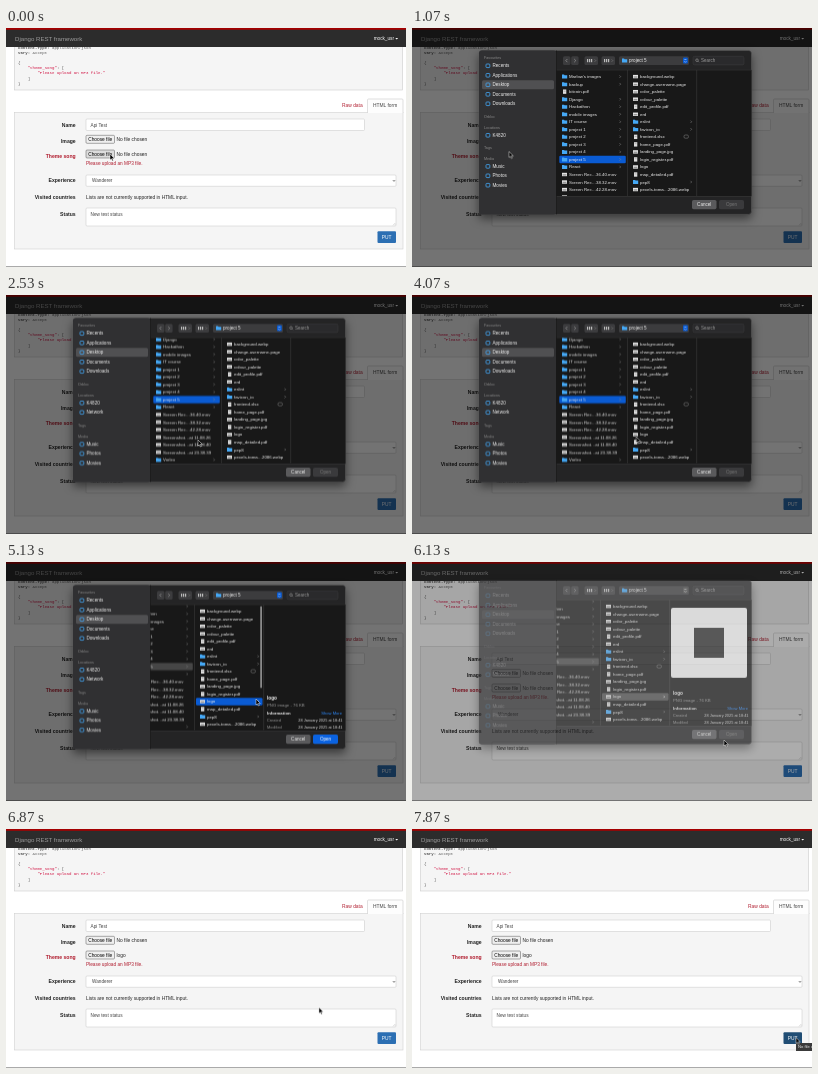
An HTML page for the animation above (8000 ms loop, 400 px wide and 239 px high).

```html
<!DOCTYPE html>
<html lang="en">
<head>
<meta charset="utf-8">
<title>Uploading a file through an API form</title>
<style>
html, body { margin: 0; width: 100%; height: 100%; overflow: hidden; background: #fff; }
svg { display: block; width: 100vw; height: 100vh; font-family: "Liberation Sans", Arial, sans-serif; }
.mono { font-family: "Liberation Mono", monospace; white-space: pre; }
.b { font-weight: bold; }
.a { animation: 8s linear infinite; }
.s { animation: 8s step-end infinite; }
.shadow { filter: drop-shadow(0 4px 5px rgba(0, 0, 0, .5)); }

.pointer { animation-name: pointer; animation-timing-function: ease-in-out; }
@keyframes pointer {
  0%, .6% { transform: translate(104px, 126px); }
  6.6%, 13.4% { transform: translate(97px, 123.5px); }
  23.4% { transform: translate(190px, 142px); }
  31.5%, 37.8% { transform: translate(192px, 145px); }
  48.4%, 50% { transform: translate(224px, 142px); }
  60.9%, 65% { transform: translate(250px, 137px); }
  74.4%, 85% { transform: translate(312px, 178px); }
  95.9%, 100% { transform: translate(384px, 208.5px); }
}
.dim { animation-name: dim; }
@keyframes dim {
  0%, 13.37% { opacity: 0; }
  13.375%, 75% { opacity: .55; }
  79%, 100% { opacity: 0; }
}
.sheet { animation-name: sheet; }
@keyframes sheet {
  0%, 13.37% { opacity: 0; }
  13.375%, 75% { opacity: 1; }
  76.6% { opacity: .66; }
  78.4% { opacity: .25; }
  80%, 100% { opacity: 0; }
}
.drift { animation-name: drift; }
@keyframes drift {
  0%, 13.4% { transform: none; }
  15%, 75.2% { transform: translateY(.6px); }
  80%, 100% { transform: translateY(-15.4px); }
}
.scroll { animation-name: scroll; animation-timing-function: ease-in-out; }
@keyframes scroll {
  0%, 24.5% { transform: none; }
  31.5%, 100% { transform: translateY(-27.5px); }
}
.slide { animation-name: slide; animation-timing-function: ease-out; }
@keyframes slide {
  0%, 62% { transform: none; }
  64%, 100% { transform: translateX(-27px); }
}
.lower { animation-name: lower; }
@keyframes lower { 0% { transform: translateY(-10.2px); } 20%, 100% { transform: none; } }
.network { animation-name: network; }
@keyframes network { 0% { opacity: 0; } 20%, 100% { opacity: 1; } }
.picked { animation-name: picked; }
@keyframes picked { 0% { opacity: 0; } 62.5%, 100% { opacity: 1; } }
.folder-row { animation-name: folder-row; }
@keyframes folder-row { 0% { fill: #0a5bd3; } 62.5%, 100% { fill: #464646; } }
.accent { animation-name: accent; }
@keyframes accent { 0% { fill: #0a5bd3; } 75%, 100% { fill: #505050; } }
.inactive { animation-name: inactive; }
@keyframes inactive { 0% { opacity: 1; } 75%, 100% { opacity: .35; } }
.scroller { animation-name: scroller; }
@keyframes scroller { 0% { opacity: 0; } 62.5% { opacity: 1; } 72.5%, 100% { opacity: 0; } }
.thumb { animation-name: thumb; }
@keyframes thumb { 0% { opacity: 0; } 65.8%, 100% { opacity: 1; } }
.ready { animation-name: ready; }
@keyframes ready { 0% { opacity: 0; } 62.5% { opacity: 1; } 75%, 100% { opacity: 0; } }
.press { animation-name: press; }
@keyframes press { 0% { fill: #dcdcdc; } 8.37%, 100% { fill: #efefef; } }
.empty { animation-name: empty; }
@keyframes empty { 0% { opacity: 1; } 80%, 100% { opacity: 0; } }
.chosen { animation-name: chosen; }
@keyframes chosen { 0% { opacity: 0; } 80%, 100% { opacity: 1; } }
.put { animation-name: put; }
@keyframes put { 0% { fill: #2c6fb3; } 95%, 100% { fill: #204d74; } }
.tip { animation-name: tip; }
@keyframes tip { 0%, 96% { opacity: 0; } 98.2%, 100% { opacity: 1; } }
</style>
</head>
<body>
<svg id="stage" viewBox="0 0 400 239" preserveAspectRatio="none"></svg>
<script>
const BLUE = '#45a8f5', ACCENT = '#0a5bd3', RED = '#b01c2e', ROW = 7.53, TOP = 48.6;

const rect = (x, y, w, h, fill, more = '') =>
  `<rect x="${x}" y="${y}" width="${w}" height="${h}" fill="${fill}" ${more}/>`;
const path = (d, stroke, more = '') =>
  `<path d="${d}" fill="none" stroke="${stroke}" ${more}/>`;
// y is the middle of the line
const text = (x, y, str, size = 4.85, fill = '#222', more = '') =>
  `<text x="${x}" y="${y + size * .35}" font-size="${size}" fill="${fill}" ${more}>${str}</text>`;
const group = (cls, body, more = '') => `<g class="${cls}" ${more}>${body}</g>`;

const END = 'text-anchor="end"', MID = 'text-anchor="middle"', BOLD = 'class="b"';

/* ---- page ---- */
const code = (line, str, x = 12, fill = '#555', more = '') =>
  text(x, 19.2 + line * 5.15, str, 4.05, fill, 'class="mono" ' + more);
const label = (y, str, fill = '#222') => text(69.7, y, str, 5.1, fill, `${BOLD} ${END}`);
const field = (y, w, h) => rect(80, y, w, h, '#fff', 'stroke="#c4c4c4" stroke-width=".5" rx="1"');
const chooser = (y, cls = '') =>
  rect(80, y - 4, 28.5, 8, '#efefef', `class="${cls}" stroke="#555" stroke-width=".5" rx="1"`) +
  text(94.2, y, 'Choose file', 4.8, '#000', MID);

function page() {
  const response =
    rect(8.5, 10, 388, 52, '#f5f5f5', 'stroke="#ccc" stroke-width=".6"') +
    code(0, '<tspan font-weight="bold">Content-Type:</tspan> application/json') +
    code(1, '<tspan font-weight="bold">Vary:</tspan> Accept') +
    code(3, '{') + code(4, '"theme_song"', 21.7, '#d01040') + code(4, ': [', 50.9) +
    code(5, '"Please upload an MP3 file."', 31.4, '#d01040') +
    code(6, ']', 21.7) + code(7, '}');
  const nav =
    rect(0, 0, 400, 19, '#2c2c2c') + rect(0, 0, 400, 1.8, '#a30000') +
    text(9, 10.7, 'Django REST framework', 6.1, '#9d9d9d') +
    text(388, 10.7, 'mock_usr', 4.7, '#fff', END) +
    '<path d="M389.3 10h2.8l-1.4 1.6z" fill="#fff"/>';
  const tabs =
    rect(8.5, 84.5, 388.5, 136.5, '#f5f5f5', 'stroke="#d0d0d0" stroke-width=".6"') +
    path('M361.5 85V72q0-1 1-1H396q1 0 1 1V85', '#ccc', 'stroke-width=".6" style="fill:#fdfdfd"') +
    text(336, 77.5, 'Raw data', 4.9, RED) + text(367, 77.5, 'HTML form', 4.9, '#444');
  const form =
    label(97, 'Name') + field(91, 278.5, 11.5) + text(84.5, 97, 'Api Test', 4.7, '#444') +
    label(113.5, 'Image') + chooser(111.3) + text(110.5, 111.3, 'No file chosen') +
    label(128, 'Theme song', RED) + chooser(126, 's press') +
    group('s empty', text(110.5, 126, 'No file chosen')) +
    group('s chosen', text(110.5, 126, 'logo')) +
    text(80, 135, 'Please upload an MP3 file.', 4.75, RED) +
    label(152.7, 'Experience') + field(147, 310, 11.3) + text(86, 152.7, 'Wanderer', 4.7, '#444') +
    path('M386.8 152l1.2 1.4l1.2-1.4', '#333', 'stroke-width=".6"') +
    label(169, 'Visited countries') + text(80, 169, 'Lists are not currently supported in HTML input.') +
    label(186, 'Status') + field(180, 310, 18) + text(84.5, 186, 'New test status', 4.7, '#444') +
    path('M387 197.3l2.3-2.3M388.4 197.3l.9-.9', '#888', 'stroke-width=".3"') +
    rect(371.5, 203.3, 18.5, 11.8, '#2c6fb3', 'class="s put" rx="1"') +
    text(380.7, 209.2, 'PUT', 4.9, '#fff', MID);
  return rect(0, 0, 400, 239, '#fff') + response + nav + tabs + form +
    rect(0, 238, 400, 1, '#aaa');
}

/* ---- file dialog ---- */
const icons = {
  dir: (x, y) => `<path d="M${x} ${y - 2}h2l.6.6h2.6v3.4h-5.2z" fill="${BLUE}"/>`,
  doc: (x, y) => rect(x + 1, y - 2.2, 3.3, 4.4, '#ddd') + rect(x + 1.7, y - .8, 1.9, .5, '#888'),
  img: (x, y) => rect(x, y - 1.7, 5, 3.4, '#e4e4e4') + rect(x + .6, y - .3, 3.8, 1.4, '#999'),
};
const chevron = (x, y, c = '#888') =>
  path(`M${x} ${y - 1.2}l1.2 1.2l-1.2 1.2`, c, 'stroke-width=".55"');

// one column of files; each entry is "kind name"
const column = (x, entries) => entries.map((entry, i) => {
  const [kind, ...words] = entry.split(' '), y = TOP + i * ROW;
  return icons[kind](x, y) + text(x + 7, y, words.join(' '), 4.35, '#eee') +
    (kind === 'dir' ? chevron(x + 57.5, y) : '');
}).join('');

const home = [
  "dir Marlow's images", 'dir backup', 'doc bitcoin.pdf', 'dir Django', 'dir Hackathon',
  'dir mobile images', 'dir IT course', ...[1, 2, 3, 4, 5].map(n => 'dir project ' + n), 'dir React',
  ...['36.40', '38.32', '42.28'].map(t => `img Screen Rec…${t}.mov`),
  ...['11.08.26', '11.08.40', '23.38.39'].map(t => 'img Screenshot…at ' + t), 'dir Vorlex',
];
const project = [
  'img background.webp', 'img change-username-page', 'img color_palette', 'img colour_palette',
  'doc edit_profile.pdf', 'img erd', 'dir eslint', 'dir favicon_io', 'doc frontend.xlsx',
  'doc home_page.pdf', 'img landing_page.jpg', 'doc login_register.pdf', 'img logo',
  'doc map_detailed.pdf', 'dir pep8', 'img pexels-toma…2086.webp',
];

const heading = (y, str) => text(72, y, str, 3.7, '#8a8a8a');
const place = (y, str) =>
  rect(74, y - 1.8, 3.8, 3.6, 'none', `stroke="${BLUE}" stroke-width=".8" rx=".8"`) +
  text(80.5, y, str, 4.6, '#eee');

function sidebar() {
  const places = heading(30, 'Favourites') + rect(70, 52.3, 72, 9, '#505052', 'rx="1.5"') +
    ['Recents', 'Applications', 'Desktop', 'Documents', 'Downloads']
      .map((s, i) => place(37.8 + i * 9.5, s)).join('') +
    heading(88.6, 'Orbloc') + heading(99.7, 'Locations') + place(107.3, 'K4820') +
    group('s network', place(116.8, 'Network')) +
    group('s lower', heading(129.6, 'Tags') + heading(140.6, 'Media') +
      ['Music', 'Photos', 'Movies'].map((s, i) => place(148.6 + i * 9.4, s)).join(''));
  return rect(67, 22.4, 77.5, 164, '#303032', 'rx="3"') + group('s inactive', places);
}

function toolbar() {
  const box = (x, w) => rect(x, 28.3, w, 8.6, '#3c3c3e', 'rx="1.5"');
  const bars = x => [0, 2, 4].map(d => rect(x + d, 31, 1.2, 3.2, '#bbb')).join('');
  return box(151, 7.4) + box(159.2, 7.4) +
    path('M155.4 31l-1.6 1.6l1.6 1.6M162.2 31l1.6 1.6l-1.6 1.6', '#999', 'stroke-width=".7"') +
    box(172.5, 13.5) + bars(175) + chevron(182.6, 32.6) +
    box(189.5, 13.5) + bars(192) + chevron(199.6, 32.6) +
    box(207, 70) + icons.dir(210, 32.6) + text(217, 32.6, 'project 5', 4.6, '#eee') +
    rect(271, 29.6, 4.8, 6, ACCENT, 'class="s accent" rx="1"') +
    path('M272.4 32l1-1l1 1M272.4 33.3l1 1l1-1', '#fff', 'stroke-width=".5"') +
    rect(281, 28.3, 51, 8.6, '#2a2a2c', 'rx="1.5" stroke="#444" stroke-width=".4"') +
    '<circle cx="285" cy="32.2" r="1.3" fill="none" stroke="#aaa" stroke-width=".5"/>' +
    path('M286 33.2l1 1', '#aaa', 'stroke-width=".5"') +
    text(289, 32.6, 'Search', 4.5, '#999');
}

function preview() {
  const fact = (y, name, time) =>
    text(261, y, name, 3.9, '#999') + text(336.5, y, time, 3.9, '#ddd', END);
  return group('s thumb',
      rect(259, 50, 76, 70, '#f6f6f6', 'rx="2"') + rect(282, 70, 30, 30, '#2b2b2b')) +
    text(261, 135.8, 'logo', 4.7, '#eee', BOLD) + text(261, 142.4, 'PNG image - 76 KB', 4.3, '#999') +
    text(261, 150.8, 'Information', 4.3, '#eee', BOLD) + text(336, 150.8, 'Show More', 4.1, '#2f8cff', END) +
    fact(158, 'Created', '28 January 2025 at 18:41') +
    fact(164.8, 'Modified', '28 January 2025 at 18:41');
}

function dialog() {
  const mark = (x, i, cls) =>
    rect(x, TOP + i * ROW - 3.8, 66.5, 7.6, ACCENT, `class="${cls}" rx="1.2"`);
  const first = group('a scroll', mark(147.3, 11, 's folder-row') + column(150, home));
  const second = group('s picked', mark(217, 12, 's accent')) + column(221, project) +
    rect(272, 107, 4.4, 3.2, 'none', 'stroke="#888" stroke-width=".5" rx="1.2"') +
    group('s picked', chevron(278.5, TOP + 12 * ROW, '#fff')) +
    group('s scroller', rect(281.2, 43.5, 1.8, 82, '#8a8a8a', 'rx=".9"'));
  const lists = group('a slide', first + second +
    rect(215, 42, .6, 126, '#3a3a3a') + rect(284.5, 42, .6, 126, '#3a3a3a'));
  const button = (x, w, str, fill, ink) =>
    rect(x, 172, w, 9.2, fill, 'rx="1.6"') + text(x + w / 2, 176.6, str, 4.6, ink, MID);
  return rect(67, 22.4, 272.5, 164, '#242425',
      'class="shadow" rx="3" stroke="#5c5c5c" stroke-width=".5"') +
    sidebar() + rect(144.5, 42, 195, 126, '#181818') +
    group('', lists + group('s picked', preview()), 'clip-path="url(#files)"') + toolbar() +
    rect(144.5, 41.8, 195, .5, '#3a3a3a') + rect(144.5, 168, 195, .5, '#3a3a3a') +
    rect(144.3, 22.4, .5, 164, '#111') +
    button(280, 24.5, 'Cancel', '#5a5a5c', '#eee') +
    button(307, 25, 'Open', '#3a3a3c', '#777') +
    group('s ready', button(307, 25, 'Open', '#0a62e0', '#fff'));
}

const tooltip = rect(384, 214, 40, 8, '#3a3a3a') + text(386, 218, 'No file chosen', 4.2, '#eee');
const arrow = '<path d="M0 0v6l1.4-1.2l.9 2.1l1-.4l-.9-2.1h1.9z" fill="#000" stroke="#fff" stroke-width=".45"/>';

document.getElementById('stage').innerHTML =
  '<defs><clipPath id="files"><rect x="144.8" y="42.3" width="194.5" height="125.7"/></clipPath></defs>' +
  page() + rect(0, 0, 400, 239, '#000', 'class="a dim"') +
  group('a sheet', group('a drift', dialog())) +
  group('a tip', tooltip) + group('a pointer', arrow);
</script>
</body>
</html>
```
